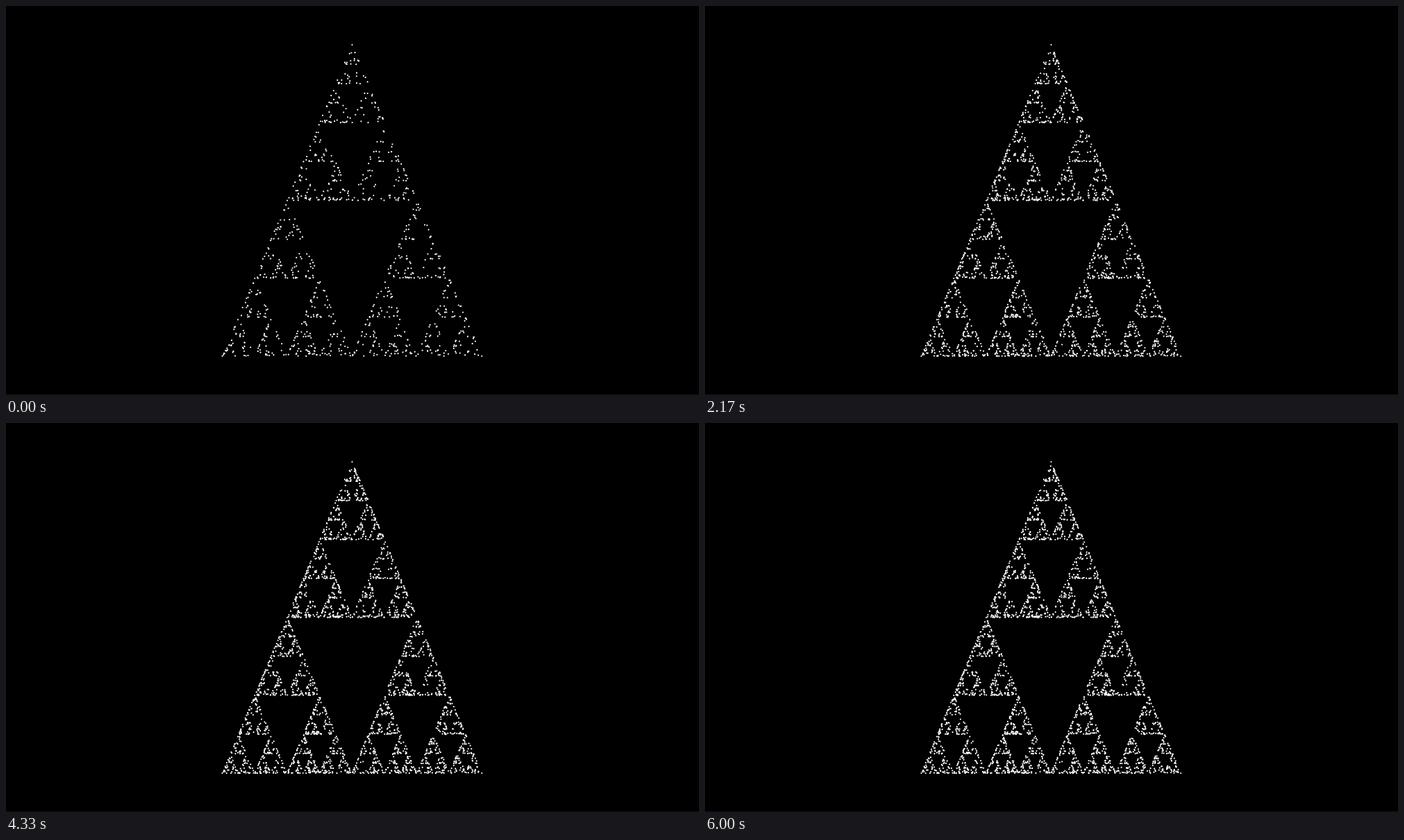
Recreate the animation shown at these times as an HTML page with a canvas. Size 998 px wide and 561 px high, loop 6030 ms.

```html
<!DOCTYPE html>
<html lang="en">
<head>
<meta charset="utf-8">
<title>Chaos game</title>
<style>
  html, body { margin: 0; width: 100%; height: 100%; overflow: hidden; background: #000; }
  canvas { display: block; }
</style>
</head>
<body>
<canvas id="stage" width="998" height="561"></canvas>
<script>
const ctx = document.getElementById('stage').getContext('2d');
const LOOP = 6030, STEP = 100 / 3, STEPS = 180;
const START = 1000, GROWTH = 2400, SLOWING = 90, RADIUS = 1.1;
const corners = [[498.5, 56], [311.5, 505], [685.2, 505]];

function seeded(seed) {
  return () => {
    seed = (seed + 0x6D2B79F5) | 0;
    let t = Math.imul(seed ^ (seed >>> 15), 1 | seed);
    t = (t + Math.imul(t ^ (t >>> 7), 61 | t)) ^ t;
    return ((t ^ (t >>> 14)) >>> 0) / 4294967296;
  };
}

// Each point lies halfway between the previous one and a random corner.
function chaosGame(count) {
  const random = seeded(21);
  const points = [...corners];
  let [x, y] = corners[0];
  while (points.length < count) {
    const [cx, cy] = corners[Math.floor(random() * 3)];
    x = (x + cx) / 2;
    y = (y + cy) / 2;
    points.push([x, y]);
  }
  return points;
}

// New points become rarer as the triangle fills up.
const countAt = step => Math.round(START + GROWTH * (1 - Math.exp(-step / SLOWING)));
const points = chaosGame(countAt(STEPS));

function draw(step) {
  ctx.fillStyle = '#000';
  ctx.fillRect(0, 0, 998, 561);
  ctx.fillStyle = '#111';
  ctx.fillRect(0, 560, 998, 1);
  ctx.fillStyle = '#fff';
  for (const [x, y] of points.slice(0, countAt(step))) {
    ctx.beginPath();
    ctx.arc(x, y, RADIUS, 0, 2 * Math.PI);
    ctx.fill();
  }
}

const begin = performance.now();
let shown = -1;

function tick() {
  const t = (performance.now() - begin) % LOOP;
  // The small offset rounds step times to hundredths of a second.
  const step = Math.min(STEPS, Math.floor((t + 3.4) / STEP));
  if (step !== shown) draw(shown = step);
  requestAnimationFrame(tick);
}
tick();
</script>
</body>
</html>
```
